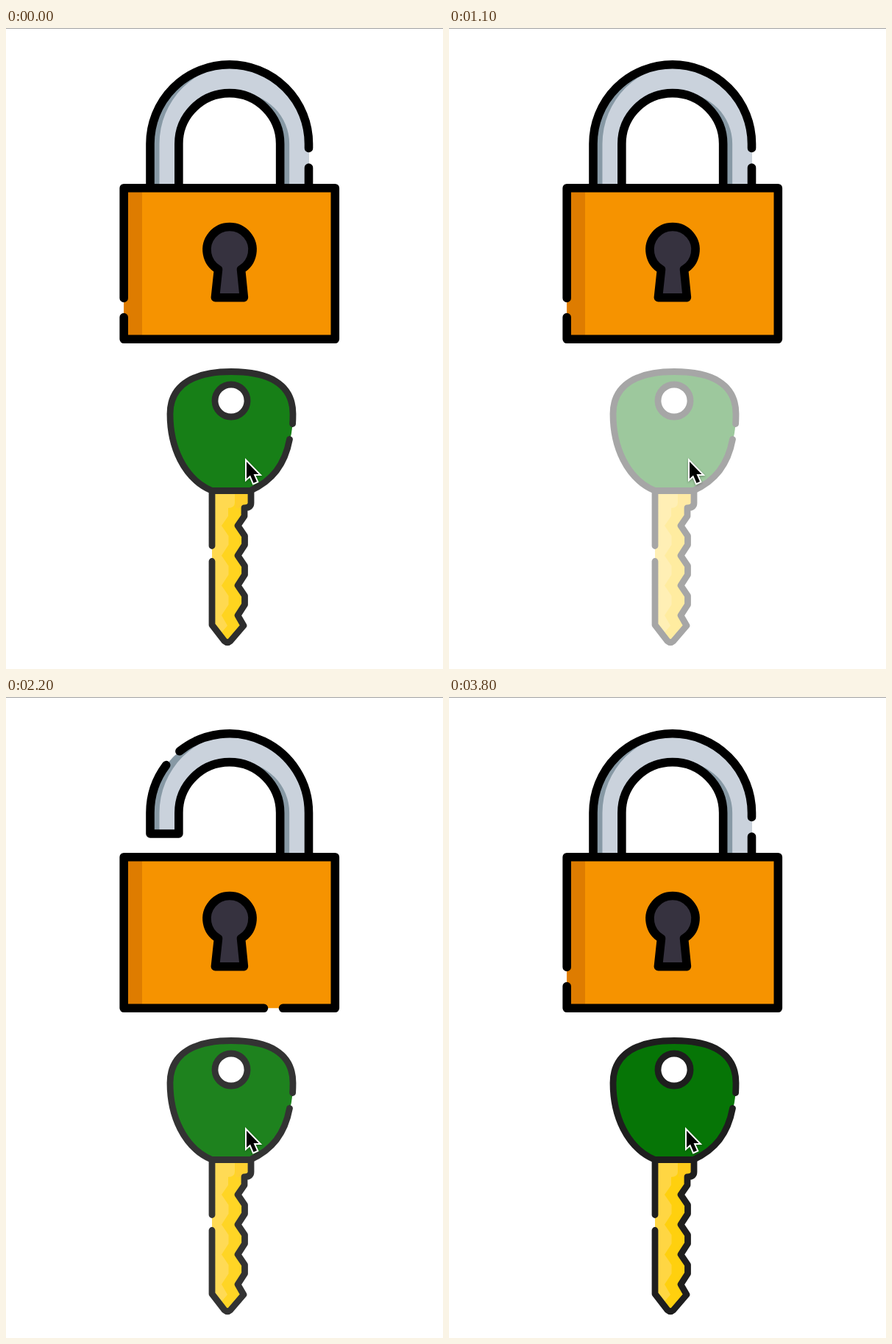
These frames come from a looping animation (594x872 px, 3900 ms). An HTML page:

```html
<!DOCTYPE html>
<html lang="en">
<head>
<meta charset="utf-8">
<title>Lock and key</title>
<style>
  html, body { margin: 0; width: 100%; height: 100%; overflow: hidden; background: #fff; }
  svg { display: block; width: 594px; height: 872px; }
  .line { fill: none; stroke: #000; stroke-width: 11.6; stroke-linecap: round; stroke-linejoin: round; }
  .edge { fill: none; stroke: #1a1a1a; stroke-width: 8.8; stroke-linecap: round; stroke-linejoin: round; }
</style>
</head>
<body>
<svg viewBox="0 0 594 872">
  <defs>
    <clipPath id="bandClip"><path class="band"/></clipPath>
    <clipPath id="bladeClip"><path class="blade"/></clipPath>
  </defs>
  <rect width="594" height="1" fill="#a0a0a0"/>

  <g id="lock">
    <path class="band" fill="#8799a5"/>
    <g clip-path="url(#bandClip)"><path class="band" fill="#cad2dc" transform="translate(12.5 0)"/></g>
    <path id="shackle" class="line"/>
    <path fill="#f69300" d="M160.2 217.7H447.3V423.3H160.2Z"/>
    <path fill="#de7c00" d="M160.2 217.7H185V423.3H160.2Z"/>
    <path id="body" class="line"/>
    <path class="line" style="fill:#36323f" d="M288.5 328.4A31 31 0 1 1 319.5 328.4L323.4 366.7H284.4Z"/>
  </g>

  <g id="key">
    <path class="blade" fill="#ffd00a"/>
    <g clip-path="url(#bladeClip)">
      <path class="blade" fill="#ffd640" transform="translate(-22 0)"/>
      <path fill="#ffca16" d="M312 630H334V653H312Z"/>
    </g>
    <path fill="#027302" d="M280 629.5C241 613 223 569 223 525C223 483 259 467.5 306 467.5C357 467.5 390 484 390 525Q390 599 332 629.5Z"/>
    <path id="bladeEdge" class="edge"/>
    <path class="edge" d="M385.5 559.5C379 594 362 616 332 629.5H280C241 613 223 569 223 525C223 483 259 467.5 306 467.5C357 467.5 390 484 390 525Q390 532 389.6 538.5"/>
    <circle class="edge" cx="306" cy="507" r="22" style="fill:#fff"/>
  </g>

  <path id="cursor" d="M0 0V23L5 18.5L9.5 29L14 27L9.5 17H16.5Z" fill="#000" stroke="#fff" stroke-width="4"
    paint-order="stroke" style="filter:drop-shadow(0 1px 1.5px rgba(0,0,0,.35))"/>
</svg>
<script>
  const LOOP = 3900, TICK = 100;
  const RELEASES = [100, 1100, 2030, 3450]; // each one flips the lock
  const PRESS = 160, DEPTH = 0.615, RECOVER = 100;
  const MOVE_START = 2800, MOVE_TIME = 500;

  const $ = id => document.getElementById(id);
  const setAll = (name, d) => document.querySelectorAll('.' + name).forEach(el => el.setAttribute('d', d));

  // Blade: four notches between shoulder and tip
  let teeth = 'L333 646Q333 652.5 324 653V664';
  for (let i = 0; i < 4; i++) {
    const y = 677 + i * 40.7;
    teeth += `L315 ${y}`;
    teeth += i < 3 ? `L324.5 ${y + 14}V${y + 26}` : 'L323 813';
  }
  teeth += 'L305 834Q301 837.5 297 834L280 812';
  setAll('blade', `M280 630H333${teeth}Z`);
  $('bladeEdge').setAttribute('d', `M280 630V704.5M333 630${teeth}V725.5`);

  // Shackle: half circles on straight legs
  const CX = 303.75, CY = 157.5, R = 107.75, r = 68.9;
  const left = CX - R, right = CX + R;
  const inLeft = CX - r, inRight = CX + r;
  const rim = deg => {
    const a = deg * Math.PI / 180;
    return `${CX - R * Math.cos(a)} ${CY - R * Math.sin(a)}`;
  };
  const arc = (radius, sweep, end) => `A${radius} ${radius} 0 0 ${sweep} ${end}`;
  const over = arc(R, 1, `${right} ${CY}`);
  const inner = `V${CY}${arc(r, 1, `${inRight} ${CY}`)}V217`;

  const poses = {
    locked: {
      foot: 217,
      shackle: `M${left} 217V${CY}${over}V163.5M${right} 190V217M${inLeft} 217${inner}`,
      body: 'M160.2 367.5V217.7H447.3V423.3H160.2V393.5'
    },
    open: {
      foot: 186,
      shackle: `M${rim(37)}${arc(R, 0, `${left} ${CY}`)}V186H${inLeft}${inner}M${rim(51)}${over}V217`,
      body: 'M350.5 423.3H160.2V217.7H447.3V423.3H376.5'
    }
  };

  let shown;
  function setLock(name) {
    if (name === shown) return;
    shown = name;
    const { foot, shackle, body } = poses[name];
    const back = arc(r, 0, `${inLeft} ${CY}`);
    setAll('band', `M${left} ${foot}V${CY}${over}V217H${inRight}V${CY}${back}V${foot}Z`);
    $('shackle').setAttribute('d', shackle);
    $('body').setAttribute('d', body);
  }

  // Fades in while pressed, decays after release
  function dim(t, release) {
    const since = t - release;
    if (since >= 0) return DEPTH * Math.exp(-since / RECOVER);
    return DEPTH * Math.max(0, 1 + since / PRESS) ** 2;
  }

  // Jumps aside, then glides back to just left of its resting place
  function cursorAt(t) {
    if (t < MOVE_START) return [327, 590];
    const p = Math.min(1, (t - MOVE_START) / MOVE_TIME);
    const away = 1 - p * p * (3 - 2 * p);
    return [323 + 24 * away, 590 + 23 * away];
  }

  function draw(now) {
    const t = Math.floor(now % LOOP / TICK) * TICK;
    const flips = RELEASES.filter(ms => ms <= t).length;
    setLock(flips % 2 ? 'open' : 'locked');
    $('key').setAttribute('opacity', 1 - RELEASES.reduce((sum, ms) => sum + dim(t, ms), 0));
    $('cursor').setAttribute('transform', `translate(${cursorAt(t)})`);
  }

  const start = performance.now();
  function tick() {
    draw(performance.now() - start);
    requestAnimationFrame(tick);
  }
  tick();
</script>
</body>
</html>
```
